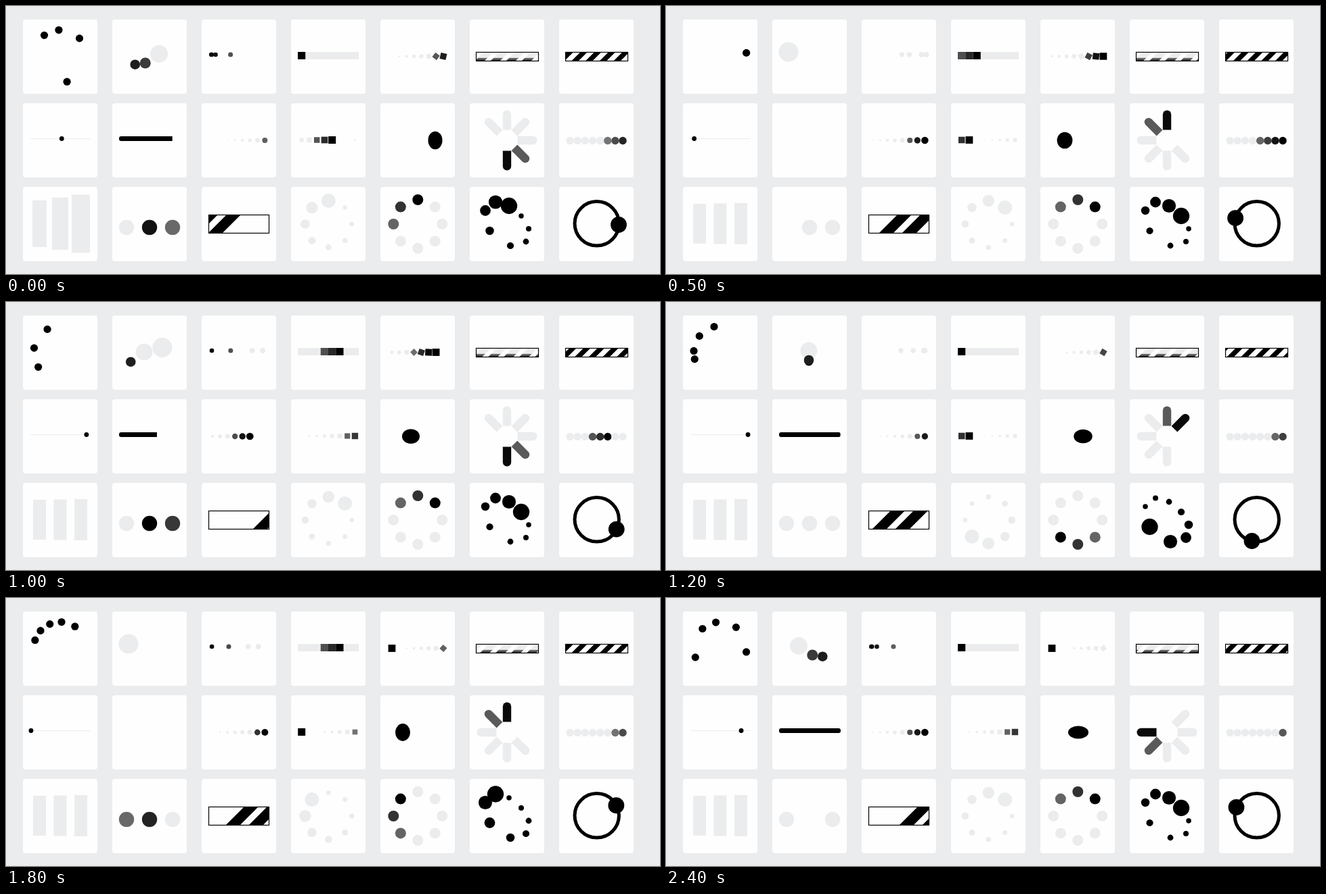
Write an HTML page with a canvas that moves like this. It is 966 px wide and 397 px high and loops after 2.5 s.

```html
<!DOCTYPE html>
<html lang="en">
<head>
<meta charset="utf-8">
<title>Preloaders</title>
<style>
html, body { margin: 0; width: 100%; height: 100%; overflow: hidden; background: #ebeced; }
canvas { display: block; }
</style>
</head>
<body>
<canvas id="stage" width="966" height="397"></canvas>
<script>
const ctx = document.getElementById('stage').getContext('2d');
const GRAY = '#ebeced', WHITE = '#fefefe', BLACK = '#000';
const RAD = Math.PI / 180;

const mod = (a, n) => ((a % n) + n) % n;
const clamp = (v, lo = 0, hi = 1) => Math.min(hi, Math.max(lo, v));
const smooth = v => { const u = clamp(v); return u * u * (3 - 2 * u); };

// Linear path through [time, value] points
function along(t, path) {
  let i = 1;
  while (i < path.length - 1 && t > path[i][0]) i++;
  const [t0, v0] = path[i - 1], [t1, v1] = path[i];
  return v0 + (v1 - v0) * (t - t0) / (t1 - t0);
}

// Dark levels stay gray steps, lighter ones fall to the pale tone
function tone(v) {
  if (v > 124) return GRAY;
  const n = Math.max(0, Math.round(v));
  return `rgb(${n},${n},${n})`;
}

function dot(x, y, r, fill = BLACK, ry = r) {
  if (r <= 0) return;
  ctx.fillStyle = fill;
  ctx.beginPath();
  ctx.ellipse(x, y, r, ry, 0, 0, 7);
  ctx.fill();
}

function box(x, y, w, h, fill = BLACK) {
  ctx.fillStyle = fill;
  ctx.fillRect(x, y, w, h);
}

function round(x, y, w, h, r, fill) {
  ctx.fillStyle = fill;
  ctx.beginPath();
  ctx.roundRect(x, y, w, h, r);
  ctx.fill();
}

function square(x, y, s, fill, turn = 0) {
  if (s <= 0) return;
  ctx.save();
  ctx.translate(x, y);
  ctx.rotate(turn);
  box(-s / 2, -s / 2, s, s, fill);
  ctx.restore();
}

function frame(x, y, w, h) {
  ctx.strokeStyle = BLACK;
  ctx.lineWidth = 1.2;
  ctx.strokeRect(x + .5, y + .5, w - 1, h - 1);
}

function slant(x, y, w, h, fill) {
  ctx.fillStyle = fill;
  ctx.beginPath();
  ctx.moveTo(x, y);
  ctx.lineTo(x + w, y);
  ctx.lineTo(x + w - h, y + h);
  ctx.lineTo(x - h, y + h);
  ctx.fill();
}

function clipped(x, y, w, h, r, draw) {
  ctx.save();
  ctx.beginPath();
  ctx.roundRect(x, y, w, h, r);
  ctx.clip();
  draw();
  ctx.restore();
}

// Eight cells lit one after another; each gets its age since the head passed
function row(head, draw) {
  for (let i = 0; i < 8; i++) {
    const age = mod(head - i + .5, 10) - .5;
    draw(i, Math.max(age, 0));
  }
}

// Five dots chase each other: fast in, slow over the top, fast out
function orbitDots(k) {
  const runs = [
    [[6, 240], [10, 331], [18, 394], [24, 610]],
    [[9, 265], [14, 337], [18, 363], [24, 458], [25, 525]],
    [[10, 236], [14, 310], [18, 337], [25, 407]],
    [[12, 255], [14, 281], [18, 312], [25, 357], [29, 500]],
    [[14, 239], [18, 288], [25, 323], [28, 360], [32, 525]]
  ];
  for (const run of runs) {
    for (const t of [k, k + 25]) {
      if (t < run[0][0] || t > run[run.length - 1][0]) continue;
      const a = along(t, run) * RAD;
      dot(80 + 39 * Math.sin(a), 74.5 - 39 * Math.cos(a), 5.6);
    }
  }
}

function swapBalls(k) {
  const s = ((k + 4) % 11 - 5) / 2, q = s * s;
  if (Math.abs(s) > 1.3) return dot(181, 68, 14.6, GRAY);
  const swing = Math.sin(1.7 * s);
  dot(211 - 20 * swing, 72 - 4.5 * q, 12.5 + 2 * q, GRAY);
  dot(211 + 7 * swing, 88 - 14 * q, 6.5 + 6 * q, tone(235 * q));
  dot(211 + 27 * swing, 86 + 2.7 * q, 7.3, tone(30));
}

function shuttle(k) {
  const lead = 360 + 55 * k - .42 * k * k;
  const spread = 25 * Math.sin(Math.PI * k / 26) ** 2;
  for (let i = 3; i >= 0; i--) {
    const u = (1 - Math.cos((lead - 8 * i * i - spread * i) * RAD)) / 2;
    dot(303.3 + 82 * u, 72, 3.3 + .7 * u, tone(u * 235));
  }
}

function cellBar(k) {
  box(431, 68, 90, 11, GRAY);
  const head = Math.floor(2.5 * (k % 4));
  for (let i = Math.max(0, head - 2); i <= head; i++) {
    box(431 + 11.25 * i, 68, 11.25, 11, tone(40 * (head - i)));
  }
}

function turningSquares(k) {
  row(8.4 + 1.73 * k, (i, a) =>
    square(570 + 10.85 * i, 74.5, 10.8 - 1.15 * a, tone(15 * a * a), 6.5 * a * a * RAD));
}

function shadedBar(k) {
  clipped(694, 68, 93, 14, 0, () => {
    box(694, 68, 93, 14, WHITE);
    const g = ctx.createLinearGradient(0, 82, 0, 75);
    g.addColorStop(0, '#111');
    g.addColorStop(.7, '#777');
    g.addColorStop(.8, GRAY);
    const off = mod(4.25 * k + 5, 23);
    for (let i = -1; i < 6; i++) slant(701 + off + 23 * i, 68, 14, 14, g);
  });
  frame(694, 68, 93, 14);
}

function stripedBar(k) {
  clipped(826, 68, 93, 14, 0, () => {
    box(826, 68, 93, 14, WHITE);
    const off = mod(4.6 * k, 20.7);
    for (let i = -1; i < 6; i++) slant(828 + off + 20.7 * i, 68, 10.3, 14, BLACK);
  });
  frame(826, 68, 93, 14);
}

function beadOnLine(k) {
  box(36, 196, 89, 1, GRAY);
  dot(80 + 44 * Math.cos((87 + 24.5 * k) * RAD), 196.5, 3.4);
}

function fillBar(k) {
  const m = (k + 4) % 11;
  const left = 91 * smooth((m - 6) / 2.5), right = 91 * smooth(m / 5.2);
  clipped(167, 193, 91, 7, 3, () => box(167 + left, 193, right - left, 7));
}

function shrinkingDots(k) {
  row(9.3 + 1.575 * k, (i, a) => dot(305 + 11.05 * i, 199, 5.4 - .62 * a, tone(18 * a * a)));
}

function shrinkingSquares(k) {
  row(4 + 10 * k / 7, (i, a) => square(436.7 + 11.25 * i, 198.5, 11 - 1.25 * a, tone(42 * a)));
}

// Bounces between two walls, flat in the middle and tall at the sides
function squashBall(k) {
  const run = along(k, [[0, 13], [14, 139], [18, 213], [24, 266]]);
  const off = Math.abs(mod(run, 152) - 76) - 38;
  const d = Math.abs(off) / 38;
  dot(609 + off, 199, 15 - 6.8 * d, BLACK, 9.5 + 6.5 * d ** 1.3);
}

function spokes(k) {
  const head = Math.floor(4.73 + 2.425 * k);
  for (let age = 0; age < 6; age++) {
    ctx.save();
    ctx.translate(740, 199);
    ctx.rotate((head - age) * 45 * RAD);
    round(-6.2, -44.5, 12.4, 29, [6.2, 6.2, 0, 0], tone(10 + 80 * age));
    ctx.restore();
  }
}

function chain(k) {
  row(7.9 + 1.72 * k, (i, a) => dot(833 + 11.15 * i, 199.5, 5.7, tone(40 * a)));
}

function bars(k) {
  const s = Math.max(0, Math.cos(2 * Math.PI * k / 7));
  for (let i = 0; i < 3; i++) {
    const w = 19 + s * (2 + 3 * i), h = 59 + i + s * (10 + 7.5 * i);
    box(49.5 + 30.5 * i - w / 2, 322.5 - h / 2, w, h, GRAY);
  }
}

// Each circle pops in black, fades to pale, and is gone shortly before the next pop
function trio(k) {
  const pops = [[7, 16.5], [-.25, 10, 17.5, 24.75], [-1.5, 3, 9.2]];
  pops.forEach((list, i) => {
    const waits = list.map(p => p - k);
    if (waits.some(w => w > 0 && w < 2.4)) return;
    const since = Math.min(9, ...waits.filter(w => w <= 0).map(w => -w));
    dot(178 + 34 * i, 328, 11.2, tone(70 * since));
  });
}

function passingStripes(k) {
  const lead = 280 + mod(67 - 30 * k, 200);
  clipped(299, 309, 90, 28, 0, () => {
    slant(lead - 21, 309, 21, 28, BLACK);
    slant(lead - 55, 309, 21, 28, BLACK);
  });
  frame(299, 309, 90, 28);
}

// Three wheels share one head that steps clockwise
function wheels(k) {
  const head = Math.round(12 * k / 7);
  const spots = [[743, 296], [761, 311], [772, 330], [768, 349], [745, 355], [714.5, 333], [708, 303], [723, 290.5]];
  for (let i = 0; i < 8; i++) {
    const age = mod(head - i, 8);
    const s = Math.sin(i * 45 * RAD), c = Math.cos(i * 45 * RAD);
    const r = 3 + 7.5 * Math.exp(-((age / 2.7) ** 1.3));
    dot(476.3 + 34.5 * s, 323 - 34.5 * c, r, GRAY);
    dot(608.3 + 36 * s, 323 - 36 * c, 8, tone(50 * age));
    dot(...spots[i], 1.16 * r);
  }
}

function ring(k) {
  ctx.strokeStyle = BLACK;
  ctx.lineWidth = 5;
  ctx.beginPath();
  ctx.arc(872.7, 322.3, 32.7, 0, 7);
  ctx.stroke();
  const a = (93 + 38.3 * k) * RAD;
  dot(872.5 + 32.5 * Math.sin(a), 322.3 - 32.5 * Math.cos(a), 11.9);
}

const loaders = [
  orbitDots, swapBalls, shuttle, cellBar, turningSquares, shadedBar, stripedBar,
  beadOnLine, fillBar, shrinkingDots, shrinkingSquares, squashBall, spokes, chain,
  bars, trio, passingStripes, wheels, ring
];

function paint(k) {
  box(0, 0, 966, 397, GRAY);
  for (let i = 0; i < 21; i++) {
    round(25 + 132 * (i % 7), 20 + 124 * Math.floor(i / 7), 110, 110, 4, WHITE);
  }
  for (const draw of loaders) draw(k);
}

const start = performance.now();
function tick(now) {
  paint(Math.floor(Math.max(0, now - start) / 100) % 25);
  requestAnimationFrame(tick);
}
paint(0);
requestAnimationFrame(tick);
</script>
</body>
</html>
```
